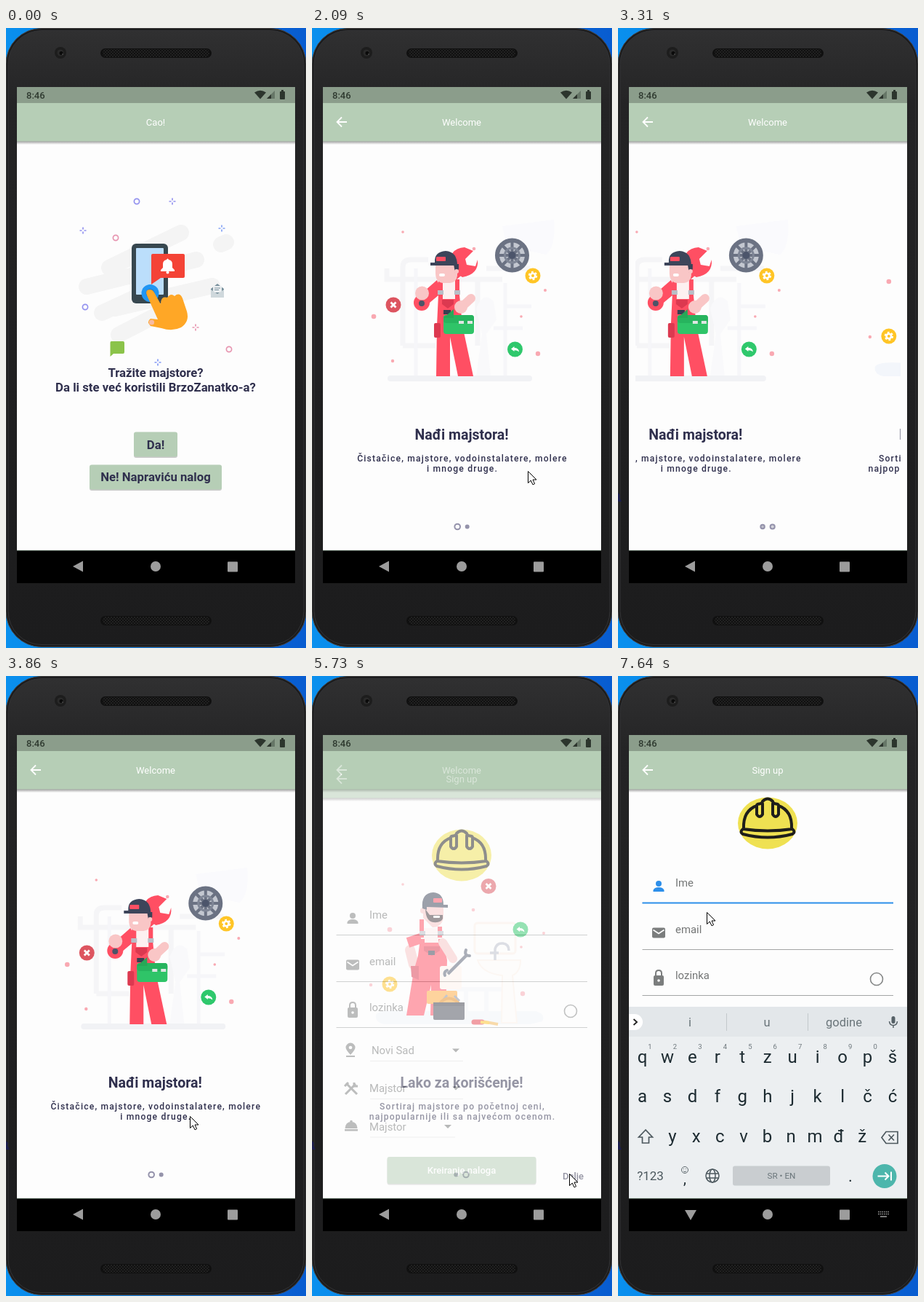
An HTML page that plays this animation: 413 by 851 pixels, repeating every 8 s.

```html
<!DOCTYPE html>
<html lang="sr">
<head>
<meta charset="utf-8">
<title>App walkthrough</title>
<style>
  html, body { margin: 0; width: 100%; height: 100%; overflow: hidden; background: #0b6cd8; }
  svg { display: block; width: 413px; height: 851px; font-family: Roboto, sans-serif; }
</style>
</head>
<body>
<svg id="stage" viewBox="0 0 413 851"></svg>
<script>
const GREEN = '#b6ceb6', NAVY = '#2f2f4d', GRAY = '#7b7d7d', RED = '#ff4f63', SKIN = '#f9c6c6', KEY = '#1d2b31';
const LOOP = 8000, PAGE = 365;

// Markup helpers
const text = (x, y, size, str, fill, extra = 'text-anchor="middle"') =>
  `<text x="${x}" y="${y}" font-size="${size}" fill="${fill}" ${extra}>${str}</text>`;
const bold = 'text-anchor="middle" font-weight="700"';
const medium = 'text-anchor="middle" font-weight="500"';
const rect = (x, y, w, h, fill, r = 0, extra = '') =>
  `<rect x="${x}" y="${y}" width="${w}" height="${h}" rx="${r}" fill="${fill}" ${extra}/>`;
const dot = (x, y, r, fill, extra = '') => `<circle cx="${x}" cy="${y}" r="${r}" fill="${fill}" ${extra}/>`;
const path = (d, fill, extra = '') => `<path d="${d}" fill="${fill}" ${extra}/>`;
const line = (d, color, w = 1, extra = '') =>
  `<path d="${d}" fill="none" stroke="${color}" stroke-width="${w}" ${extra}/>`;
const round = 'stroke-linecap="round" stroke-linejoin="round"';
const group = (id, body, extra = '') => `<g id="${id}" ${extra}>${body}</g>`;
const at = (x, y, body) => `<g transform="translate(${x} ${y})">${body}</g>`;

const appBar = (title, back = true) =>
  rect(15, 81, 383, 637, '#fdfdfd') + rect(15, 155, 383, 5, 'url(#shade)') + rect(15, 81, 383, 74.5, GREEN) +
  text(206, 133.5, 13.03, title, '#fff') +
  (back ? line('M48 129H35M41 122.5L34.5 129L41 135.5', '#fff', 1.8) : '');
const button = (x, y, w, h) => rect(x, y + 1.5, w, h, '#0003', 3) + rect(x, y, w, h, GREEN, 3);

const glyphs = {
  cross: line('M-3.5-3.5L3.5 3.5M3.5-3.5L-3.5 3.5', '#fff', 2.8),
  gear: dot(0, 0, 3.3, 'none', 'stroke="#fff" stroke-width="2.6"') +
    dot(0, 0, 5.2, 'none', 'stroke="#fff" stroke-width="2" stroke-dasharray="2.8 2.65"'),
  reply: path('M-5.5-.5L-1-4V-2Q5-2 5.5 3.5Q3 1.2-1 1.2V3Z', '#fff'),
};
const badge = (x, y, fill, glyph) => at(x, y, dot(0, 0, 10.5, fill) + glyphs[glyph]);
const pinkDots = list => list.map(([x, y, r]) => dot(x, y, r, '#f9a9b2')).join('');

// Phone shell
const speaker = y => rect(130, y, 153, 13, '#101010', 6.5) + rect(133, y + 1, 147, 11, 'url(#holes)', 5);
const shell =
  rect(0, 0, 413, 851, 'url(#desk)') +
  rect(0, .5, 413, 849, '#1b1b1c', 49, 'stroke="#454444"') +
  rect(3, 3.5, 407, 843, 'url(#body)', 46, 'stroke="#333335"') +
  dot(75, 34, 8, '#1d1d1d') + dot(75, 34, 4.5, '#2a2a2a') + dot(76, 34.5, 2.5, '#0a0a0a') + dot(78, 36, .8, '#666') +
  speaker(28) + speaker(807) + rect(15, 81, 383, 681, '#000');

const systemBars =
  rect(15, 81, 383, 22, '#0000003d') + text(28, 97, 13.03, '8:46', '#2f3a30', 'font-weight="500"') +
  path('M342 88.5Q350 83 358 88.5L350 97.5Z', '#2c352d') + path('M370 86V97H359Z', '#667667') +
  path('M365 91V97H359Z', '#2c352d') + rect(377, 87, 7, 11, '#2c352d', 1) + rect(379, 85, 3, 3, '#2c352d') +
  rect(15, 717, 383, 45, '#000') + rect(15, 716.5, 383, .8, '#b4ccb9') +
  path('M92 739L106 731.5V746.5Z', '#9c9c9c', 'id="backKey"') +
  dot(206, 739, 7, '#9c9c9c') + rect(305, 732.5, 14, 14, '#9c9c9c', 1) +
  group('imeKey', line('M358 735.5H373M358 738.5H373', '#999', 1.6, 'stroke-dasharray="1.6 1.1"') +
    line('M361 742H370', '#999', 1.6));

// First screen
const sparkle = (x, y, c) => line(`M${x - 4.5} ${y}h3m3 0h3M${x} ${y - 4.5}v3m0 3v3`, c, 1.7);
const ring = (x, y, c) => dot(x, y, 3.6, 'none', `stroke="${c}" stroke-width="1.7"`);
const LILAC = '#9392ef', ROSE = '#e795b0';
const touchArt =
  line('M142 329L241 281M111 355L262 318M132 391L195 362M150 385L284 354M155 421L225 385M296 297L303 294',
    '#f4f4f4', 22, round) +
  sparkle(229, 238, LILAC) + sparkle(106, 278, LILAC) + sparkle(297, 275, '#86a4f5') + sparkle(209, 459, '#8398f5') +
  sparkle(261, 411, ROSE) + ring(180, 238, LILAC) + ring(109, 383, LILAC) + ring(151, 288, ROSE) + ring(307, 441, ROSE) +
  rect(173, 296, 50, 82, '#37474f', 6) + rect(179, 302, 38, 64, '#bbdefb', 1) +
  path('M202 310H244Q246 310 246 312V341Q246 343 244 343H213L200 352V312Q200 310 202 310Z', '#f44336') +
  path('M213 334V332L216 329V324Q216 319 221 318Q222.5 315 224 318Q229 319 229 324V329L232 332V334Z', '#fff') +
  dot(222.5, 335.5, 2, '#fff') +
  dot(198.5, 364, 12, '#2196f3') + dot(198.5, 364, 6, '#1976d2') +
  path('M194 367Q191 359 198 359Q202 359 204 363L213 379Q213 367 222 370Q227 363 232 368Q239 362 243 371L249 389Q253 403 241 411Q229 417 214 412L199 409Q193 403 199 399L209 400Z', '#ffa726') +
  dot(200.5, 404, 3.6, '#f8bba0') +
  path('M145 430H161Q163 430 163 432V445Q163 447 161 447H148L143.5 451V432Q143.5 430 145 430Z', '#8bc34a') +
  path('M282 358L291 351L300 358V370H282Z', '#78909c') + rect(285, 354, 12, 9, '#eceff1') +
  path('M282 359L291 365L300 359V370H282Z', '#cfd8dc') + line('M287 357h8M287 359.5h6', '#78909c');

const home = appBar('Cao!', false) + touchArt +
  text(206, 479, 16.76, 'Tražite majstore?', NAVY, bold) +
  text(206, 499, 16.76, 'Da li ste već koristili BrzoZanatko-a?', NAVY, bold) +
  button(176, 554.5, 60, 34) + text(206, 577.5, 16.76, 'Da!', NAVY, bold) +
  button(115, 599.5, 182, 34) +
  dot(255, 622, 0, '#000', 'id="ripple" clip-path="url(#buttonClip)"') +
  text(206, 622, 16.76, 'Ne! Napraviću nalog', NAVY, bold);

// Onboarding pages
const plumberArt =
  path('M262 272L333 263Q336 300 322 311L268 300Z', '#fafafd') +
  line('M103 330V345H262M125 436V328Q125 318 136 318H160M125 436H170M228 436V345M240 330H300', '#f5f5f7', 7) +
  line('M143 330V478M266 350V478M250 412H290M268 382H302', '#f6f6f9', 5) +
  path('M226 478L234 420L226 385Q236 360 250 375L254 400L240 420L246 478Z', '#f9f9fb') +
  rect(104, 477, 199, 8, '#f1f2f5', 4) +
  path('M188 330Q188 302 210 301L222 306L211 317L213 325L225 327L228 318Q230 338 207 342Z', RED) +
  line('M202 334L152 377', RED, 13) + dot(151, 377, 11, RED) + dot(151, 378, 4, '#4d5468') +
  path('M172 346L156 360L165 374L180 362Z', RED) + dot(151.5, 364, 9.5, SKIN) +
  rect(175, 345, 28, 30, '#fdf0f0', 4) +
  path('M172 408L174 366H180V372H197V366H203L207 408L222 478H201L190 424V478H171Z', RED) +
  line('M177 345V366M200 345V366', RED, 6) + rect(173, 360, 8, 6, '#b9bdc6') + rect(196, 360, 8, 6, '#b9bdc6') +
  path('M179 373H195V379L187 385L179 379Z', '#dc3950') + rect(168, 405, 9, 20, '#dc3950', 2) +
  path('M170 325H200V340Q199 349 190 350H180Q170 349 170 336Z', SKIN) +
  path('M195 324H202V331L197 336Z', '#3a4256') + dot(199, 334, 3, SKIN) + rect(175, 337, 8, 4, '#fff', 2) +
  path('M169 322Q168 307 184 306Q200 307 200 326H163V322Z', '#3d455a') + rect(171, 314, 13, 6, RED, 1) +
  line('M219 371L206 383', SKIN, 12, round) +
  line('M181 390H191', '#394052', 6) + rect(181, 394, 42, 26, '#2fc468', 4) + rect(181, 394, 42, 11, '#27b45e', 4) +
  path('M181 398L195 386V398Z', '#27a857') + dot(205, 383, 9, SKIN) +
  rect(202, 402, 7, 4, '#dfe6e3') + rect(214, 402, 7, 4, '#dfe6e3') +
  dot(275.5, 312, 20.5, '#c3c7d0', 'stroke="#6b7283" stroke-width="6"') +
  line('M275.5 292V332M255.5 312H295.5M261.5 298L289.5 326M289.5 298L261.5 326', '#6b7283', 4) +
  dot(275.5, 312, 10, 'none', 'stroke="#7f8696" stroke-width="3"') + dot(275.5, 312, 5, '#4c556b') +
  badge(304, 340, '#ffc526', 'gear') + badge(112, 380, '#dd5560', 'cross') + badge(279.5, 441, '#2fc86c', 'reply') +
  pinkDots([[125, 280, 1.8], [223, 303, 2.3], [85, 396, 3.3], [111, 457, 2.2], [321, 360, 2], [288, 396, 1.8], [311, 447, 3.2]]);

const sinkArt =
  path('M88 465Q92 457 130 460H308Q322 464 317 474L300 478H100Q86 476 88 465Z', '#f3f6fb') +
  line('M212 432V470M240 430V470M180 430H262', '#f5f7fb', 6) +
  rect(224, 339, 56, 42, '#fefdfc', 4, 'stroke="#fcf1e8" stroke-width="3"') +
  path('M228 390H287Q287 406 276 411L282 476H261L262 411Q234 408 228 390Z', '#fefcfa', 'stroke="#fcf2ea" stroke-width="2"') +
  line('M252 390V375Q254 366 263 367Q271 368 271 377M245 380H257', '#bcc1cc', 3.5) +
  line('M135 376L140 396', SKIN, 14, round) + line('M150 360L132 366', RED, 14) +
  rect(150, 346, 30, 32, '#fdf0f0', 4) +
  path('M146 384L149 361H155V366H174V361H180L186 390L184 466H163L164 424L154 466H130L140 405Z', RED) +
  path('M136 398H147V417L137 413Z', '#dc3950') +
  line('M151 334V359M176 344V359', RED, 6) + rect(148, 350, 8, 6, '#b9bdc6') + rect(173, 350, 8, 6, '#b9bdc6') +
  path('M154 371H176V377L165 384L154 377Z', '#dc3950') + rect(160, 377, 9, 6, '#394052') +
  line('M180 366L194 388', SKIN, 12, round) + rect(176, 398, 30, 32, '#fff4ee', 3) +
  path('M153 315H181V332Q178 345 166 345L153 332Z', SKIN) + dot(153, 322, 4, SKIN) +
  path('M156 320L162 328H180V333Q178 339 167 338Q157 337 156 320Z', '#43373d') + rect(167, 329, 9, 3, '#fff', 1) +
  path('M152 319Q150 298 167 297Q181 298 181 314H187V318L158 317V321Z', '#3d455a') + rect(167, 305, 12, 6, RED, 1) +
  line('M187 409L213 383', '#596276', 4.5) + line('M183 411Q181 406 186 404M212 376Q209 384 217 384', '#596276', 4, round) +
  rect(158, 432, 42, 18, '#ffab40', 2) + line('M178 448L186 438M203 446L196 439', '#8a91a3', 3) +
  line('M176 449Q188 436 202 449', '#e48c23', 4) + rect(167, 448, 43, 24, '#4c4f5c', 2) + rect(167, 448, 43, 5, '#3d404c') +
  line('M234 474L256 478', '#f5b95a', 4) + line('M223 475H234', '#e6414e', 7, round) + line('M232 475L244 476', '#ffc526', 4) +
  badge(243, 288.5, '#dd5560', 'cross') + badge(287, 348, '#2fc86c', 'reply') + badge(107, 423, '#ffc526', 'gear') +
  pinkDots([[125, 286, 1.8], [107, 348, 3.3], [222, 321, 2.3], [319, 353, 2], [288, 372, 1.8], [81, 424, 2.2], [290, 436, 3.2]]);

const spaced = 'text-anchor="middle" font-weight="500" letter-spacing="1.21"';
const slide = (art, title, first, second) => art + text(206, 564.5, 19.55, title, NAVY, bold) +
  text(207, 594.5, 12.1, first, NAVY, spaced) + text(207, 608.5, 12.1, second, NAVY, spaced);

const welcome = appBar('Welcome') +
  `<g clip-path="url(#pageClip)">` + group('pages',
    slide(plumberArt, 'Nađi majstora!', 'Čistačice, majstore, vodoinstalatere, molere', 'i mnoge druge.') +
    at(PAGE, 0, slide(sinkArt, 'Lako za korišćenje!', 'Sortiraj majstore po početnoj ceni,', 'najpopularnije ili sa najvećom ocenom.'))) +
  path('', '#b6ceb64d', 'id="glow"') + '</g>' +
  dot(0, 684.5, 3, '#9797a8', 'id="dotA" stroke="#9492ab" stroke-width="2"') +
  dot(0, 684.5, 3, '#9797a8', 'id="dotB" stroke="#9492ab" stroke-width="2"') +
  group('next', text(359.5, 691, 13.03, 'Dalje', NAVY, medium));

// Sign-up form
const label = (x, y, str) => text(x, y, 14.9, str, '#747676', '');
const field = (y, str) => label(79, y - 23, str) + line(`M33.5 ${y}H379`, '#a3a5a5');
const dropdown = (x, y, str, end) => label(x, y + 5, str) + line(`M80 ${y + 14.5}H${end}`, '#e2e2e2') +
  path(`M${end - 15} ${y - 2.5}h10l-5 5Z`, '#707272');
const helmet = at(206, 234, `<ellipse rx="41" ry="35.5" fill="#efe152"/>` +
  line('M-33 7Q-34-17-15-24M33 7Q34-17 15-24M-15-25V-12Q-11-6-7-12V-27M15-25V-12Q11-6 7-12V-27M-14-26Q-7-27-7-30Q0-37 7-30Q7-27 14-26M-34 8Q0 13 34 8Q39 12 34 15Q0 24-34 15Q-39 12-34 8Z', '#1e1e1b', 4, round));
const signUp = appBar('Sign up') + group('form',
  helmet + field(343.5, 'Ime') + field(407.5, 'email') + field(470.5, 'lozinka') +
  group('person', dot(56, 317, 4) + path('M48.5 328V326Q50 322 56 322Q62 322 63.5 326V328Z')) +
  line('M33.5 343.5H379', '#2d8fea', 2, 'id="focusLine"') +
  rect(47, 377.5, 18, 14, GRAY, 2) + line('M48.5 380.5L56 385.5L63.5 380.5', '#fdfdfd', 1.6) +
  rect(49, 443, 14, 14, GRAY, 2) + line('M52 443V440Q52 436 56 436Q60 436 60 440V443', GRAY, 2) + dot(56, 450, 1.8, '#fdfdfd') +
  dot(356, 448, 8.5, 'none', 'stroke="#858787" stroke-width="1.6"') +
  dropdown(82, 502, 'Novi Sad', 208) + dropdown(79, 554, 'Majstor', 208) + dropdown(79, 606.5, 'Majstor', 197) +
  path('M53 508Q46.5 501 46.5 498A6.5 6.5 0 0 1 59.5 498Q59.5 501 53 508Z', GRAY) + dot(53, 498, 2.3, '#fdfdfd') +
  rect(47, 509, 12, 2, GRAY) +
  line('M46 562L60 548M47 547L62 562', GRAY, 3) + line('M45 551L50 546M58 546V551H63', GRAY, 3) +
  path('M45.5 609Q46 600 54 600Q62 600 62.5 609Z', GRAY) + rect(45, 610, 18, 2.5, GRAY) + dot(54, 599.5, 1.8, GRAY) +
  button(103.5, 648, 205, 37) + text(206, 671, 13.03, 'Kreiranje naloga', '#fff', medium));

// Soft keyboard
const keys = (letters, x, y, step, digits) => [...letters].map((c, i) =>
  text(x + i * step, y, 24, c, KEY) + (digits ? text(x + 10.5 + i * step, y - 19, 9.5, digits[i] || '', '#6d777c') : '')).join('');
const keyboard = rect(15, 454, 383, 263, '#eceff1') + rect(15, 454, 383, 41, '#e3e7ea') +
  path('M15 464H23A11 11 0 0 1 23 486H15Z', '#fff') + line('M21.5 471L26 475L21.5 479', '#222', 1.8) +
  line('M149.5 463V487M261.5 463V487', '#c3c9cc') +
  ['i', 'u', 'godine'].map((word, i) => text(99 + i * 106, 481, 16.5, word, '#6a757a')).join('') +
  rect(376.5, 467, 5, 10, '#556066', 2.5) + line('M373.5 474Q374 479.5 379 479.5Q384 479.5 384.5 474M379 479V483', '#556066', 1.5) +
  keys('qwertzuiopš', 33.5, 530.5, 34.45, '1234567890') + keys('asdfghjklčć', 33.5, 585, 34.45) + keys('yxcvbnmđž', 75, 640, 32.65) +
  line('M38 623L28.5 633H33.5V641H42.5V633H47.5Z', '#4c585e', 1.7) +
  line('M363 633.5L369 625.5H385V641.5H369ZM372.5 629.5L380 637.5M380 629.5L372.5 637.5', '#4c585e', 1.7) +
  text(44.5, 692, 17, '?123', '#4c585e') + text(92, 697, 20, ',', KEY) + text(320, 694, 22, '.', KEY) +
  dot(92, 678, 4.5, 'none', 'stroke="#5d686d"') + line('M90 679.5Q92 682 94 679.5M90 676.5h1M93 676.5h1', '#5d686d') +
  at(130, 686, dot(0, 0, 9, 'none', 'stroke="#4c585e" stroke-width="1.5"') +
    `<ellipse rx="4" ry="9" fill="none" stroke="#4c585e" stroke-width="1.5"/>` + line('M-8-3H8M-8 3H8', '#4c585e', 1.4)) +
  rect(158, 672.5, 134, 27, '#c9cdd0', 3) + text(225, 690, 11.7, 'SR • EN', '#6a757a') +
  dot(367, 686.5, 16.5, '#4db6ac') + line('M357.5 686.5H372M367.5 681.5L372.5 686.5L367.5 691.5M376 680.5V692.5', '#fff', 2);

const stage = document.getElementById('stage');
stage.innerHTML = `<defs>
  <linearGradient id="desk"><stop stop-color="#0a90ee"/><stop offset="1" stop-color="#085cd0"/></linearGradient>
  <linearGradient id="body" x2="0" y2="1"><stop stop-color="#303031"/><stop offset=".12" stop-color="#242425"/><stop offset="1" stop-color="#1c1c1d"/></linearGradient>
  <linearGradient id="shade" x2="0" y2="1"><stop stop-color="#0006"/><stop offset="1" stop-color="#0000"/></linearGradient>
  <pattern id="holes" width="4" height="4" patternUnits="userSpaceOnUse">${dot(1, 1, 1, '#262626')}${dot(3, 3, 1, '#262626')}</pattern>
  <clipPath id="screenClip">${rect(15, 81, 383, 636, '#000')}</clipPath>
  <clipPath id="pageClip">${rect(24, 165, PAGE, 542, '#000')}</clipPath>
  <clipPath id="buttonClip">${rect(115, 599.5, 182, 34, '#000', 3)}</clipPath></defs>` +
  shell + '<g clip-path="url(#screenClip)">' + home + group('welcome', welcome) + group('signUp', signUp) +
  group('keyboard', keyboard) + '</g>' + systemBars +
  path('M0 638L3 641L2 644L5 650L0 650Z', '#1b1d4d', 'id="edgeMark"') +
  dot(0, 0, 15, '#ffff0078', 'id="click"') +
  path('M.5.5V16.5L4.3 13L7 18.8L9.6 17.6L7 12H12Z', '#fff', 'id="cursor" stroke="#000"');

// Motion
const el = Object.fromEntries([...stage.querySelectorAll('g[id],path[id],circle[id]')].map(e => [e.id, e]));
const set = (id, attrs) => { for (const k in attrs) el[id].setAttribute(k, attrs[k]); };
const show = (id, on) => set(id, { visibility: on ? 'visible' : 'hidden' });
const move = (id, x, y) => set(id, { transform: `translate(${x} ${y})` });
const between = (t, a, b) => t >= a && t < b;

// Linear interpolation over [time, value] keys
function tween(t, ...keys) {
  const i = keys.findIndex(k => t < k[0]);
  if (i < 0) return keys[keys.length - 1][1];
  if (!i) return keys[0][1];
  const [a, from] = keys[i - 1], [b, to] = keys[i];
  return from + (to - from) * (t - a) / (b - a);
}

const trail = [
  [0, 390, 900], [69, 390, 900], [70, 357, 818], [300, 300, 700], [610, 255, 622], [1600, 255, 622],
  [1880, 264, 641], [2080, 297, 608], [2560, 297, 608], [2690, 120, 612], [2760, 17, 618], [2830, -60, 622],
  [3380, -60, 622], [3600, 120, 612], [3790, 253, 604], [3890, 253, 604], [3990, 40, 606], [4030, -60, 606],
  [4380, -60, 610], [4650, 303, 610], [4720, 303, 610], [5190, 354, 683], [6130, 354, 683], [6670, 122, 324],
];

function scrollAt(t) {
  if (between(t, 3155, 3890)) { // overdamped spring back to the first page
    const s = (t - 3155) / 1000;
    return -254 * (1.7 * Math.exp(-9.07 * s) - .7 * Math.exp(-22 * s));
  }
  return t < 3155 ? tween(t, [2560, 0], [2910, -270], [3050, -270], [3155, -254])
    : tween(t, [3890, 0], [4100, -300], [4220, -PAGE]);
}

// Route change: the new screen fades in while rising
function enter(id, t, start, visibleFrom) {
  const u = Math.min(1, Math.max(0, (t - start) / 300));
  show(id, t >= visibleFrom);
  set(id, { opacity: u ** 1.65 });
  move(id, 0, 170 * (1 - u) ** 2.5);
}

function render(t) {
  enter('welcome', t, 1215, 1215);
  enter('signUp', t, 5535, 5728);
  set('ripple', { r: tween(t, [1080, 20], [1350, 150]), opacity: tween(t, [1079, 0], [1080, .1], [1300, .1], [1450, 0]) });

  const scroll = scrollAt(t);
  move('pages', scroll, 0);
  const f = tween(t, [2790, 0], [2990, 1], [3230, 1], [3430, 0], [4010, 0], [4210, 1]);
  set('dotA', { cx: 200.2 - 1.9 * f, r: 3.8 - 1.8 * f, 'fill-opacity': f });
  set('dotB', { cx: 213.7 - 1.7 * f, r: 2 + 1.8 * f, 'fill-opacity': 1 - f });
  el.next.style.display = scroll < -PAGE / 2 ? '' : 'none';
  const g = tween(t, [4200, 0], [4270, 1], [4340, 1], [4650, 0]);
  set('glow', { d: `M388 165h${-9 * g}q${-10 * g} 271 0 542H388Z`, opacity: g });

  const focused = t >= 7160, typing = t >= 7430;
  set('person', { fill: focused ? '#2d8fea' : GRAY });
  el.focusLine.style.display = focused ? '' : 'none';
  move('form', 0, tween(t, [7430, 0], [7640, -32]));
  show('keyboard', typing);
  move('keyboard', 0, 263 * (1 - tween(t, [7390, 0], [7630, 1])) ** 2);
  show('imeKey', t >= 7290);
  set('backKey', { d: typing ? 'M92 733H108L100 747Z' : 'M92 739L106 731.5V746.5Z' });

  const x = tween(t, ...trail.map(k => [k[0], k[1]])), y = tween(t, ...trail.map(k => [k[0], k[2]]));
  move('cursor', x, y);
  move('click', x, y);
  show('click', between(t, 940, 1080) || between(t, 5390, 5460) || between(t, 6890, 7010));
  show('edgeMark', t >= 3050);
}

(function frame() {
  render(performance.now() % LOOP);
  requestAnimationFrame(frame);
})();
</script>
</body>
</html>
```
